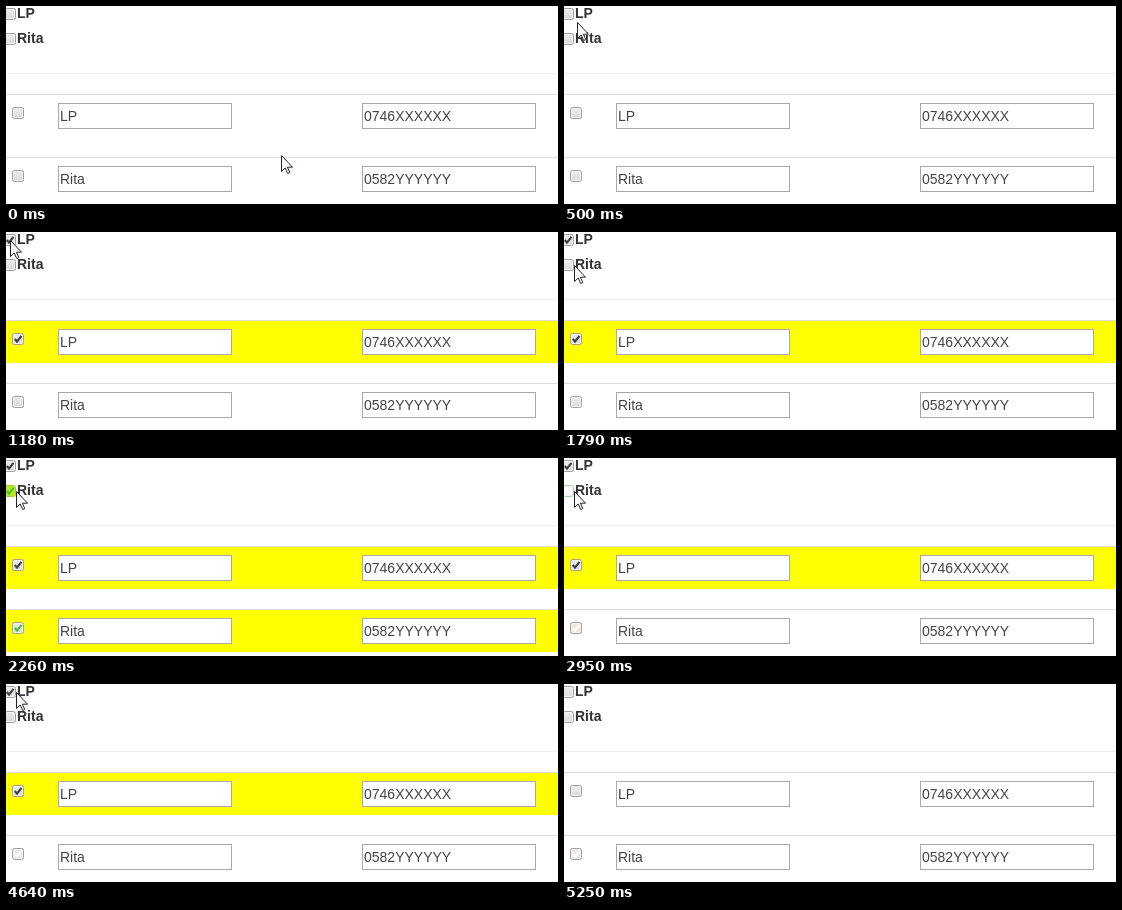
Recreate the animation shown at these times as an HTML page. Size 552x198 px, loop 6.33 s.

```html
<!DOCTYPE html>
<html lang="en">
<head>
<meta charset="utf-8">
<title>Linked checkboxes</title>
<style>
  html, body { margin: 0; width: 100%; height: 100%; overflow: hidden; background: #fff; }
  body { font: 14px/20px "Liberation Sans", Arial, sans-serif; color: #444; }
  body * { position: absolute; box-sizing: border-box; }
  hr { top: 67px; width: 100%; height: 1px; margin: 0; border: 0; background: #eee; }
  .label { left: 11px; font-weight: bold; color: #333; }
  .row { width: 100%; height: 43px; border-top: 1px solid #ddd; }
  .row.on { background: #ff0; }
  .field { top: 8px; width: 174px; height: 26px; padding-left: 1px;
    border: 1px solid #a9a9a9; background: #fff; line-height: 24px; }
  .box { width: 12px; height: 12px; border: 1px solid #a0a0a0; border-radius: 2.5px;
    background: linear-gradient(#ededed, #dadada); box-shadow: inset 0 0 0 1px #f2f2f2; }
  .box svg { left: -1px; top: -1px; visibility: hidden; }
  .box path { fill: none; stroke: #404040; stroke-width: 2.2; }
  .on svg, .pale svg { visibility: visible; }
  .green path { stroke: #4cc52c; }
  .lime { background: #b9e62a; border-color: #a5c838; box-shadow: none; }
  .clear { background: #fff; border-color: #9fd8a4; }
  .pale { background: #ece7e5; }
  .pale path { stroke: #fff; }
</style>
</head>
<body>
<hr>
<div id="list"></div>
<svg id="cursor" width="13" height="20">
  <path d="M.5 .5V16.5L4.2 13L6.7 18.5L8.8 17.6L6.4 12.2H11.5Z" fill="#fff" stroke="#223"/>
</svg>
<script>
const LOOP = 6330, FRAME = 70;
const $ = id => document.getElementById(id);

const people = [
  { name: 'LP', phone: '0746XXXXXX', on: 1180, off: 4790 },
  { name: 'Rita', phone: '0582YYYYYY', on: 2180, off: 2870 }
];

const home = { x: 275, y: 149 };
const glides = [
  { from: 70, to: 250, x: 8, y: 10 },
  { from: 400, to: 570, x: 15, y: 19 },
  { from: 720, to: 790, x: 4, y: 6 },
  { from: 950, to: 1030, x: 4, y: 8 },
  { from: 1260, to: 1330, x: 8, y: 17 },
  { from: 1720, to: 1790, x: 10, y: 33 },
  { from: 3100, to: 3330, x: 10, y: 8 },
  { from: 5020, to: 5250, x: 406, y: 212 }
];

const box = (id, x, y) => `<div id="${id}" style="left:${x}px;top:${y}px">
  <svg width="12" height="12"><path d="M2.8 6L5 8.6L9.5 2.8"/></svg></div>`;
const field = (x, value) => `<div class="field" style="left:${x}px">${value}</div>`;

$('list').style.width = '100%';
$('list').innerHTML = people.map(({ name, phone }, i) => `
  ${box('top' + i, -2, 2 + 25 * i)}
  <b class="label" style="top:${25 * i - 3}px">${name}</b>
  <div id="row${i}" style="top:${88 + 63 * i}px">
    ${box('mark' + i, 6, 12)}${field(52, name)}${field(356, phone)}
  </div>`).join('');

// The pointer is sampled about once per FRAME, so it moves in even jumps.
function pointer(t) {
  let { x, y } = home;
  for (const g of glides) {
    if (t < g.from) break;
    const gaps = Math.round((g.to - g.from) / FRAME);
    const jumps = Math.floor((t - g.from) / (g.to - g.from) * gaps) + 1;
    const p = Math.min(1, jumps / (gaps + 1));
    x += (g.x - x) * p;
    y += (g.y - y) * p;
  }
  return { x, y };
}

function draw(t) {
  const within = (a, b) => t >= a && t < b;
  people.forEach(({ on, off }, i) => {
    const state = within(on, off) ? ' on' : '';
    $('row' + i).className = 'row' + state;
    $('top' + i).className = $('mark' + i).className = 'box' + state;
    // an unchecked row must not show its tick through the row's own state
    $('mark' + i).firstElementChild.style.visibility = '';
  });
  if (within(2260, 2870)) {
    $('top1').className += ' lime green';
    $('mark1').className += ' green';
  }
  if (within(2870, 3100)) $('top1').className += ' clear';
  if (t >= 2870) $('mark1').className += ' pale';

  const { x, y } = pointer(t);
  $('cursor').style.transform = `translate(${Math.round(x)}px, ${Math.round(y)}px)`;
  $('cursor').style.visibility = t < glides.at(-1).to ? 'visible' : 'hidden';
}

const start = performance.now();
function tick() {
  draw((performance.now() - start) % LOOP);
  requestAnimationFrame(tick);
}
tick();
</script>
</body>
</html>
```
